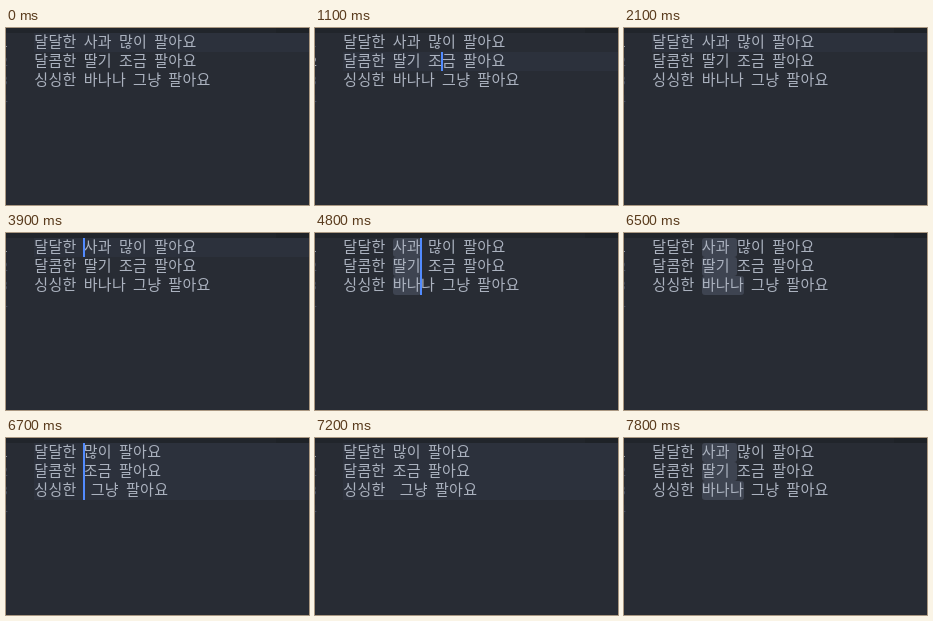
Recreate the animation shown at these times as an HTML page. Size 303 by 177 pixels, loop 8000 ms.

```html
<!DOCTYPE html>
<html lang="ko">
<head>
<meta charset="utf-8">
<title>Column selection</title>
<style>
  html, body { margin: 0; width: 100%; height: 100%; overflow: hidden; background: #282c34; }
  svg { display: block; width: 303px; height: 177px; }
  .code { font-family: "Noto Sans CJK KR", "Noto Sans Mono CJK KR", "Noto Sans CJK", sans-serif;
          font-size: 15px; font-weight: 300; fill: #abb2bf; text-anchor: middle; }
  .num { font-family: "Noto Sans Mono", "Liberation Mono", monospace; font-size: 12px;
         fill: #495162; text-anchor: end; }
  .num.on { fill: #abb2bf; }
  .line { fill: #2c313c; }
  .sel { fill: #3e4451; }
  .caret { fill: #528bff; }
  .tabs { fill: #21252b; }
  .rest { fill: #1e2227; }
</style>
</head>
<body>
<svg id="stage" viewBox="0 0 303 177"></svg>
<script>
const LOOP = 8000, LEFT = 28.2, HALF = 7.05, TOP = 5, ROW = 19;
const FULL = ["달달한 사과 많이 팔아요", "달콤한 딸기 조금 팔아요", "싱싱한 바나나 그냥 팔아요"];
const CUT = ["달달한 많이 팔아요", "달콤한 조금 팔아요", "싱싱한  그냥 팔아요"];
const START = 7; // selection anchor, in half-width columns

const at = (row, col, on = true) => ({ ends: { [row]: col }, primary: row, on });
const pick = (ends, on = true) => ({ ends: { ...ends }, primary: 0, on, sel: true });
const cut = on => ({ ends: { 0: START, 1: START, 2: START }, primary: 0, on, text: CUT });
const WORDS = [12, 12, 13];

const steps = [
  [0, at(0, 12, false)],
  [600, at(1, 17)],
  [1100, at(1, 14)],
  [1500, at(1, 14, false)],
  [1600, at(0, 12)],
  [2100, at(0, 12, false)],
  [2600, at(0, 12)],
  [3000, at(0, START)],
  [3500, at(0, START, false)],
  [3900, at(0, START)],
  [4400, pick([9, 9])],
  [4800, pick([11, 11, 11])],
  [5100, pick(WORDS)],
  [5700, pick(WORDS, false)],
  [6100, pick(WORDS)],
  [6500, pick(WORDS, false)],
  [6700, cut(true)],
  [7200, cut(false)],
  [7300, pick(WORDS)],
  [7800, pick(WORDS, false)]
];

const colX = col => Math.floor(LEFT + col * HALF);
const rowY = row => TOP + row * ROW;
const rect = (cls, x, y, w, h, extra = "") =>
  `<rect class="${cls}" x="${x}" y="${y}" width="${w}" height="${h}" ${extra}/>`;

// Hangul fills two columns, a space one.
function codeLine(str, row) {
  const xs = [];
  let col = 0, shown = "";
  for (const ch of str) {
    if (ch === " ") { col++; continue; }
    xs.push((LEFT + (col + 1) * HALF).toFixed(2));
    shown += ch;
    col += 2;
  }
  return `<text class="code" x="${xs.join(" ")}" y="${rowY(row) + 13.5}">${shown}</text>`;
}

function draw({ ends, primary, on, sel, text = FULL }) {
  const cursors = Object.entries(ends);
  let out = rect("tabs", 0, 0, 270, TOP) + rect("rest", 270, 0, 33, TOP);
  for (const [row, col] of cursors) {
    out += sel
      ? rect("sel", colX(START) + 1, rowY(row), colX(col) - colX(START), ROW, 'rx="3"')
      : rect("line", 28, rowY(row), 275, ROW);
  }
  for (let row = 0; row < 4; row++) {
    out += `<text class="num${row === primary ? " on" : ""}" x="2" y="${rowY(row) + 14}">${row + 1}</text>`;
  }
  out += text.map(codeLine).join("");
  if (on) for (const [row, col] of cursors) out += rect("caret", colX(col), rowY(row), 2, ROW);
  stage.innerHTML = out;
}

const stage = document.getElementById("stage");
const begin = performance.now();
let shown = null;

function tick() {
  const t = (performance.now() - begin) % LOOP;
  const state = steps.findLast(([time]) => time <= t)[1];
  if (state !== shown) draw(shown = state);
  requestAnimationFrame(tick);
}
tick();
</script>
</body>
</html>
```
